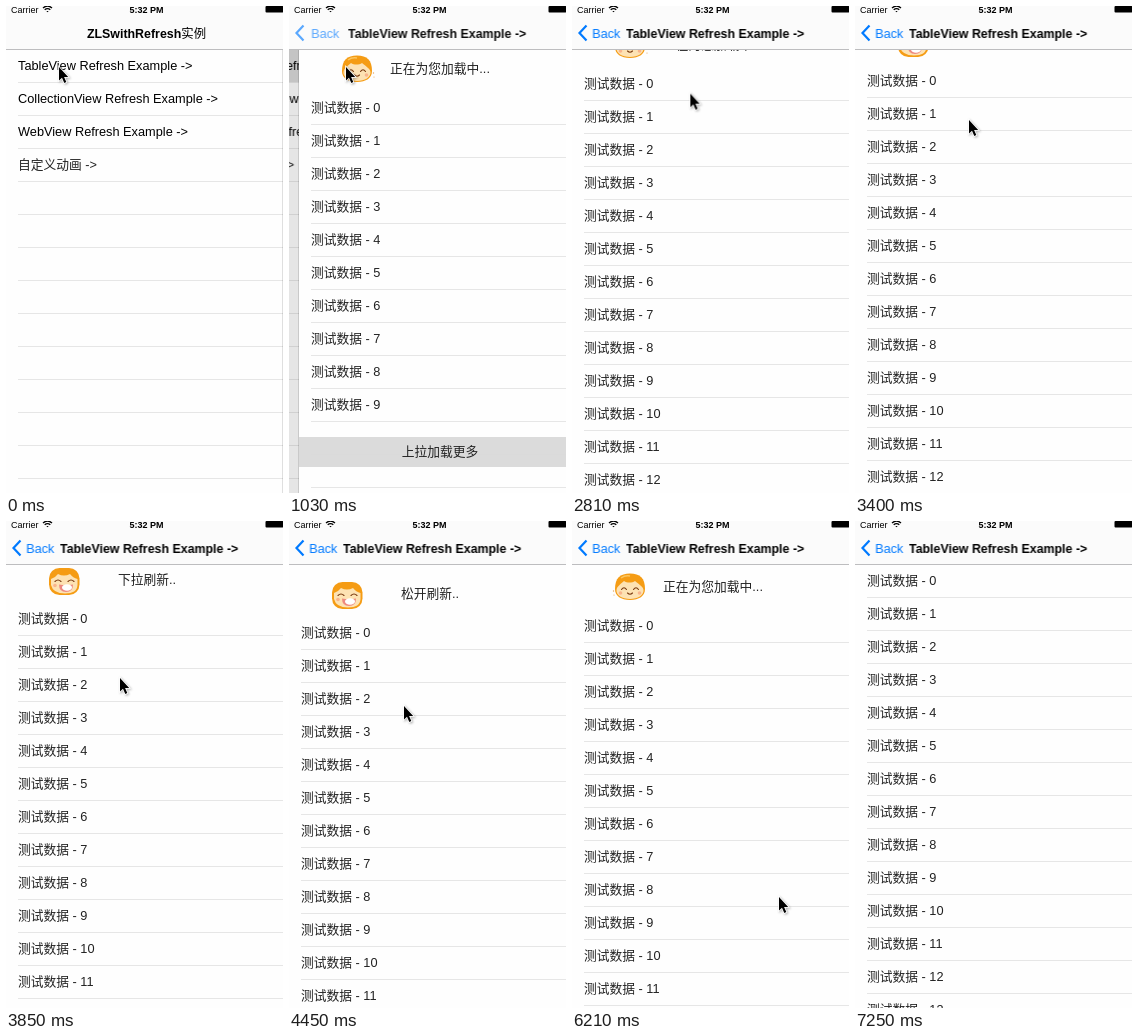
Write an HTML page that moves like this. It is 277 by 487 pixels and loops after 7690 ms.

```html
<!DOCTYPE html>
<html lang="zh-CN">
<head>
<meta charset="utf-8">
<title>Refresh demo</title>
<style>
  html, body { margin: 0; width: 100%; height: 100%; overflow: hidden; background: #fefefe; }
  svg { display: block; width: 277px; height: 487px; overflow: hidden; }
  text { font: 300 12.75px "Liberation Sans", "Noto Sans CJK SC", "Noto Sans CJK", sans-serif; fill: #000; white-space: pre; }
  .title { font-size: 12.4px; font-weight: bold; }
  .status { font-size: 9px; }
  .mid { text-anchor: middle; }
  .soft { fill: #222; }
  .blue { fill: #007aff; }
  .paper { fill: #fefefe; }
  .line { fill: #e6e6e6; }
  .grey { fill: #d9d9d9; }
  .hair { fill: #f59c14; }
  .skin { fill: #fde2b3; }
  .cheek { fill: #f9b48c; }
  .ink { fill: none; stroke: #7a3b12; stroke-width: 1.1; stroke-linecap: round; }
  #cursor { filter: drop-shadow(1px 1px 1px rgba(0, 0, 0, .3)); }
</style>
</head>
<body>
<svg viewBox="0 0 277 487">
  <g id="root">
    <rect class="paper" width="277" height="487"/>
    <rect id="tapped" class="grey" y="43" width="277" height="33"/>
    <g id="rootRows"></g>
  </g>
  <rect id="dim" width="277" height="487"/>

  <g id="page">
    <rect x="-1" width="1" height="487" opacity=".12"/>
    <rect class="paper" width="277" height="487"/>
    <g id="list">
      <g id="loading">
        <g transform="translate(58 21)">
          <path class="hair" d="M-15 2C-15-9-10-13.500 0-13.500S15-9 15 2C15 9 9 13 0 13S-15 9-15 2Z"/>
          <path class="skin" d="M-13.500 3C-13-1-9-3-6-6C-3-4 2-4 5-6C8-3 13-1 13.500 3C14 8 8 12 0 12S-14 8-13.500 3Z"/>
          <path d="M-9-9Q-5-12 0-11" fill="none" stroke="#fcc660" stroke-width="1.500"/>
          <circle class="cheek" cx="-9.500" cy="6" r="1.800"/>
          <circle class="cheek" cx="9.500" cy="6" r="1.800"/>
          <path class="ink" d="M-8.500 2.500Q-6-1-3.500 2.500M3.500 2.500Q6-1 8.500 2.500M-2.500 6Q0 8.500 2.500 6"/>
          <g id="crumbs" fill="#e9a65a">
            <circle cx="16.500" cy="4" r=".7"/><circle cx="17" cy="8" r=".6"/>
          </g>
        </g>
        <text class="mid soft" x="141" y="25">正在为您加载中...</text>
      </g>
      <g id="pulling">
        <g transform="translate(58 21)">
          <rect class="hair" x="-15" y="-12" width="30.500" height="27" rx="10.500"/>
          <path class="skin" d="M-13-1Q-8-3-6-6Q0-3 6-6Q9-2 13.500-1V5Q13 13.500 1 13.500T-13 5Z"/>
          <path class="ink" d="M-9 1.500Q-6-1.500-3 1.500M4 1.500Q7-1.500 10 1.500"/>
          <circle class="cheek" cx="-9" cy="5.500" r="1.800"/>
          <path d="M-5 4.500Q2 6 9 4.500Q9 12 2 12T-5 4.500Z" fill="#ee8a80"/>
          <ellipse cx="3" cy="7.500" rx="5" ry="3.200" fill="#fff"/>
        </g>
        <text id="pullText" class="mid soft" x="141" y="25">下拉刷新..</text>
        <text id="dropText" class="mid soft" x="141" y="25">松开刷新..</text>
      </g>
      <g id="firstRows"></g>
      <g id="moreRows"></g>
      <g id="footer">
        <rect class="grey" y="389" width="277" height="30" opacity=".94"/>
        <text class="mid soft" x="141" y="408">上拉加载更多</text>
      </g>
    </g>
  </g>

  <rect width="277" height="43" fill="#fbfbfb"/>
  <rect y="43" width="277" height="1" fill="#bdbdbf"/>
  <text id="rootTitle" class="title mid" x="140.500" y="31.500">ZLSwithRefresh<tspan font-weight="400" style="font-weight:400">实例</tspan></text>
  <text id="pageTitle" class="title" x="54" y="31.500">TableView Refresh Example -&gt;</text>
  <g id="back">
    <path d="M14.500 19.500L7.500 27L14.500 34.500" fill="none" stroke="#007aff" stroke-width="2.200"/>
    <text id="backText" class="blue" x="20" y="31.500">Back</text>
  </g>

  <text class="status" x="5" y="6.500">Carrier</text>
  <g fill="none" stroke="#000" stroke-width="1.300">
    <path d="M37 2Q41.500-2 46 2M38.700 3.800Q41.500 1.400 44.300 3.800"/>
    <path d="M40.300 5L41.500 6.300L42.700 5Z" fill="#000" stroke="none"/>
  </g>
  <text class="status mid" x="140.500" y="6.500" style="font-weight:bold">5:32 PM</text>
  <rect x="259.500" y="0" width="18" height="6.500" rx="1"/>

  <g id="cursor">
    <path d="M0 0V13.500L3 10.700L5.300 16L7.300 15.100L5.100 9.900H9.200Z" stroke="#fff" stroke-width="1.600" paint-order="stroke"/>
  </g>
</svg>
<script>
const LOOP = 7690, TICKS = 52, ROW = 33;
const $ = id => document.getElementById(id);

function addRow(parent, index, label, textClass) {
  const make = (tag, attrs) => {
    const el = document.createElementNS(parent.namespaceURI, tag);
    for (const key in attrs) el.setAttribute(key, attrs[key]);
    return parent.appendChild(el);
  };
  make("rect", { class: "line", x: 12, y: 76 + ROW * index, width: 265, height: 1 });
  if (label) make("text", { class: textClass, x: 12, y: 64 + ROW * index }).textContent = label;
}

const menu = ["TableView Refresh Example ->", "CollectionView Refresh Example ->",
  "WebView Refresh Example ->", "自定义动画 ->"];
for (let i = 0; i < 13; i++) {
  addRow($("rootRows"), i, menu[i], i < 3 ? "" : "soft");
  addRow($("firstRows"), i, i < 10 && `测试数据 - ${i}`, "soft");
}
for (let i = 10; i < 15; i++) addRow($("moreRows"), i, `测试数据 - ${i}`, "soft");

// Entries are [tick, ...values]; with `hold` a value stays until the next entry.
function track(id, entries, style, hold) {
  const last = entries[entries.length - 1];
  const all = last[0] < TICKS ? [...entries, [TICKS, ...last.slice(1)]] : entries;
  const frames = all.map(([tick, ...values], i) => ({
    offset: tick / TICKS,
    easing: hold || i === all.length - 1 ? "steps(1)" : `steps(${all[i + 1][0] - tick})`,
    ...style(...values),
  }));
  $(id).animate(frames, { duration: LOOP, iterations: Infinity, delay: -10 });
}
const move = (x, y = 0) => ({ transform: `translate(${x}px, ${y}px)` });
const fade = opacity => ({ opacity });
const toggle = (id, entries) => track(id, entries, fade, true);

// Push transition: x of the incoming page
const push = [[0, 277], [6, 95], [7, 10], [8, 0]];
const onPush = (id, style) => track(id, push, x => style(x, 1 - x / 277), true);
onPush("page", x => move(x));
onPush("root", (x, p) => move(-89 * p));
onPush("dim", (x, p) => fade(0.1 * p));
onPush("rootTitle", (x, p) => ({ ...move(-100 * p), ...fade(Math.max(0, 1 - 1.05 * p)) }));
onPush("pageTitle", (x, p) => ({ ...move(x / 2), ...fade(p) }));
onPush("back", (x, p) => fade(p ** 12));
onPush("backText", x => move(x / 5));
toggle("tapped", [[0, 0], [5, 1]]);

// Pull distance of the list
track("list", [[0, 42], [19, 18], [20, 3], [21, 0], [22, 4], [23, 15], [24, 25], [25, 32],
  [26, 38], [27, 43], [28, 47], [29, 50], [30, 52], [33, 48], [34, 45], [48, 12], [49, 0]],
  y => move(0, y), true);
toggle("loading", [[0, 1], [20, 0], [33, 1]]);
toggle("pulling", [[0, 0], [20, 1], [33, 0]]);
toggle("pullText", [[0, 1], [28, 0]]);
toggle("dropText", [[0, 0], [28, 1]]);
toggle("moreRows", [[0, 0], [19, 1]]);
toggle("footer", [[0, 1], [19, 0]]);
track("crumbs", Array.from({ length: TICKS }, (_, k) => [k, k % 4 === 2 ? -33 : 0]), x => move(x), true);

// Cursor tip
track("cursor", [[0, 53, 61], [5, 53, 61], [7, 57, 61], [8, 57, 61], [12, 127, 89], [15, 127, 89],
  [21, 114, 87], [23, 114, 114], [26, 114, 157], [30, 115, 185], [33, 115, 185], [38, 211, 232],
  [40, 211, 232], [41, 210, 290], [42, 207, 376], [43, 228, 440], [44, 233, 495]], move);
</script>
</body>
</html>
```
